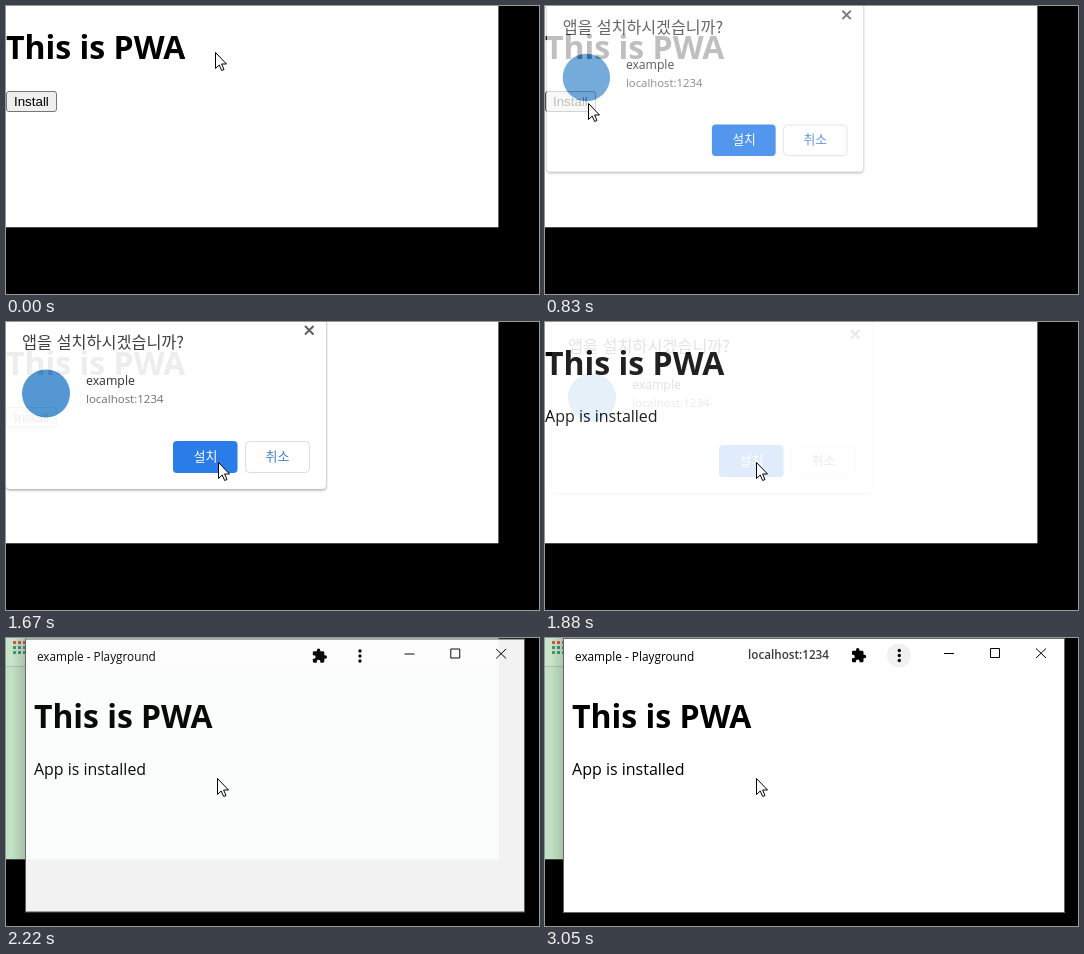
Recreate the animation shown at these times as an HTML page. Size 533 by 288 pixels, loop 3190 ms.

```html
<!DOCTYPE html>
<html lang="ko">
<head>
<meta charset="utf-8">
<title>PWA install</title>
<style>
  html, body { margin: 0; width: 100%; height: 100%; overflow: hidden; background: #000; }
  svg { display: block; width: 100vw; height: 100vh; }
  text { font-family: "Open Sans", "Noto Sans", sans-serif; white-space: pre; }
  .h1 { font-size: 32px; font-weight: 700; }
  .body { font-size: 16px; }
  .btn { font: 13.33px "Liberation Sans", Arial, sans-serif; }
  .ko { font-family: "Noto Sans CJK KR", "Noto Sans CJK", sans-serif; }
  .label { font-size: 13px; text-anchor: middle; }
  .card { filter: drop-shadow(0 1px 1.5px rgba(0, 0, 0, .45)); }
  .line { fill: none; stroke: #000; }
</style>
</head>
<body>
<svg viewBox="0 0 533 288">
  <defs>
    <linearGradient id="shade">
      <stop offset="0" stop-color="#000" stop-opacity="0"/>
      <stop offset="1" stop-color="#000" stop-opacity=".14"/>
    </linearGradient>
  </defs>
  <rect width="533" height="288"/>

  <g id="page">
    <rect width="492.4" height="221.3" fill="#fff"/>
    <text class="h1" y="53">This is PWA</text>
    <g id="install">
      <rect id="face" x=".5" y="85.5" width="50" height="20" rx="2.5"/>
      <text class="btn" x="8" y="100">Install</text>
    </g>
    <text id="done" class="body" y="100">App is installed</text>
  </g>

  <g id="browser">
    <rect width="492.4" height="221.3" fill="#c2e0c4"/>
    <rect width="492.4" height="28" fill="#c8e4ca"/>
    <path d="M0 28.5H492" stroke="#a9c4ab"/>
    <g id="apps"></g>
    <rect x="6" width="13" height="221" fill="url(#shade)"/>
  </g>

  <g id="dialog">
    <rect class="card" y="-12" width="320" height="179" rx="4" fill="#fff"/>
    <text class="ko" x="16" y="26" font-size="16.3" fill="#333">앱을 설치하시겠습니까?</text>
    <path d="M299 4l8.5 8.5M307.500 4l-8.500 8.500" stroke="#50545c" stroke-width="2"/>
    <circle cx="40" cy="71.500" r="24" fill="#4890d0"/>
    <text x="80" y="62.500" font-size="12.3" fill="#222">example</text>
    <text x="80" y="81" font-size="11.5" fill="#666">localhost:1234</text>
    <rect x="167" y="119" width="64.500" height="32" rx="4" fill="#1a73e8"/>
    <text class="ko label" x="199.500" y="139" fill="#fff">설치</text>
    <rect x="239.500" y="119.500" width="64" height="31" rx="4" fill="#fff" stroke="#dadce0"/>
    <text class="ko label" x="271.500" y="139" fill="#3579c8">취소</text>
  </g>

  <g id="win">
    <rect x="18.500" y=".5" width="501" height="274" fill="#fff" stroke="#666"/>
    <g id="content">
      <text x="30" y="22.500" font-size="11.8">example - Playground</text>
      <g id="hint">
        <text x="203" y="21.300" font-size="11.7" font-weight="600" fill="#3c3c3c">localhost:1234</text>
        <circle cx="354" cy="17.500" r="12" fill="#f1f1f2"/>
      </g>
      <path transform="translate(305.600 9.300) scale(.68)" d="M20.500 11H19V7c0-1.100-.9-2-2-2h-4V3.500a2.500 2.500 0 0 0-5 0V5H4c-1.100 0-2 .9-2 2v3.800h1.500a2.700 2.700 0 0 1 0 5.400H2V20c0 1.100.9 2 2 2h3.800v-1.500a2.700 2.700 0 0 1 5.400 0V22H17c1.100 0 2-.9 2-2v-4h1.500a2.500 2.500 0 0 0 0-5z"/>
      <circle cx="354.300" cy="12.500" r="1.700"/>
      <circle cx="354.300" cy="17.500" r="1.700"/>
      <circle cx="354.300" cy="22.500" r="1.700"/>
      <path class="line" d="M399 15.500h10M445.500 10.500h9v9h-9zM491 10.500l10 9.500M501 10.500l-10 9.500"/>
      <text class="h1" x="27" y="90">This is PWA</text>
      <text class="body" x="27" y="137">App is installed</text>
    </g>
  </g>

  <path id="cursor" d="M.5.5V16.500L4.200 13 6.700 18.500 9 17.500 6.600 12H11.500Z" fill="#fff" stroke="#000"/>
</svg>
<script>
const LOOP = 3190;
const el = id => document.getElementById(id);
const show = (id, on) => { el(id).style.display = on ? "" : "none"; };
const set = (id, attrs) => {
  for (const k in attrs) el(id).setAttribute(k, attrs[k]);
};
const mix = (a, b, p) => a + (b - a) * p;
const ease = p => p * p * (3 - 2 * p);

// Number of picture changes reached, out of n spread evenly from first to last
const count = (t, first, last, n) => {
  const k = Math.floor((t - first) / (last - first) * (n - 1) + 1.08);
  return Math.max(0, Math.min(n, k));
};
const zoom = (x, y, s) => `translate(${x} ${y}) scale(${s}) translate(${-x} ${-y})`;

// Coloured launcher grid
const reds = "#d9533f", greens = "#3f9a5c", blues = "#47868f";
[reds, blues, greens].forEach((fill, row) => {
  for (let col = 0; col < 3; col++) {
    const dot = document.createElementNS("http://www.w3.org/2000/svg", "rect");
    const attrs = { x: 7 + col * 5, y: 3 + row * 5, width: 3, height: 3, rx: .6,
                    fill: row === 1 && col === 0 ? greens : fill };
    for (const k in attrs) dot.setAttribute(k, attrs[k]);
    el("apps").append(dot);
  }
});

function drawCursor(t) {
  const a = ease(count(t, 70, 550, 8) / 8);
  const b = ease(count(t, 1180, 1670, 8) / 8);
  const x = mix(mix(209, 43, a), 212, b) - (t >= 1740 ? 1 : 0);
  const y = mix(mix(46, 97, a), 140, b);
  set("cursor", { transform: `translate(${Math.round(x)} ${Math.round(y)})` });
}

function drawPage(t) {
  const hover = t >= 480 && t < 1250;
  set("face", { fill: hover ? "#e5e5e5" : "#efefef", stroke: hover ? "#4f4f4f" : "#767676" });
  show("install", t < 1880);
  show("done", t >= 1880);
  show("page", t < 2150);
  show("browser", t >= 2150);
}

function drawDialog(t) {
  const opened = Math.min(.93, Math.max(0, count(t, 620, 1110, 8) - 1) * .25);
  const closed = count(t, 1740, 1880, 3);
  const opacity = [opened, .6, .3, .13][closed];
  const scale = 1 - .06 * (1 - opened / .93);
  const p = closed / 3;
  show("dialog", opened > 0 && t < 2150);
  set("dialog", { opacity, transform: `translate(${7 * p} ${4 * p}) ${zoom(160, 70, scale)}` });
}

function drawWindow(t) {
  const k = count(t, 2080, 2360, 5);
  show("win", k > 0);
  show("content", k > 1);
  set("win", {
    opacity: [0, .51, .82, .95, 1, 1][k],
    transform: zoom(269, 137.5, [1, .973, .988, .996, 1, 1][k])
  });
  set("hint", { opacity: count(t, 2760, 3050, 5) / 5 });
}

function draw(now) {
  const t = now % LOOP;
  drawPage(t);
  drawDialog(t);
  drawWindow(t);
  drawCursor(t);
}

let start;
function tick(now) {
  start ??= now;
  draw(now - start);
  requestAnimationFrame(tick);
}
draw(0);
requestAnimationFrame(tick);
</script>
</body>
</html>
```
